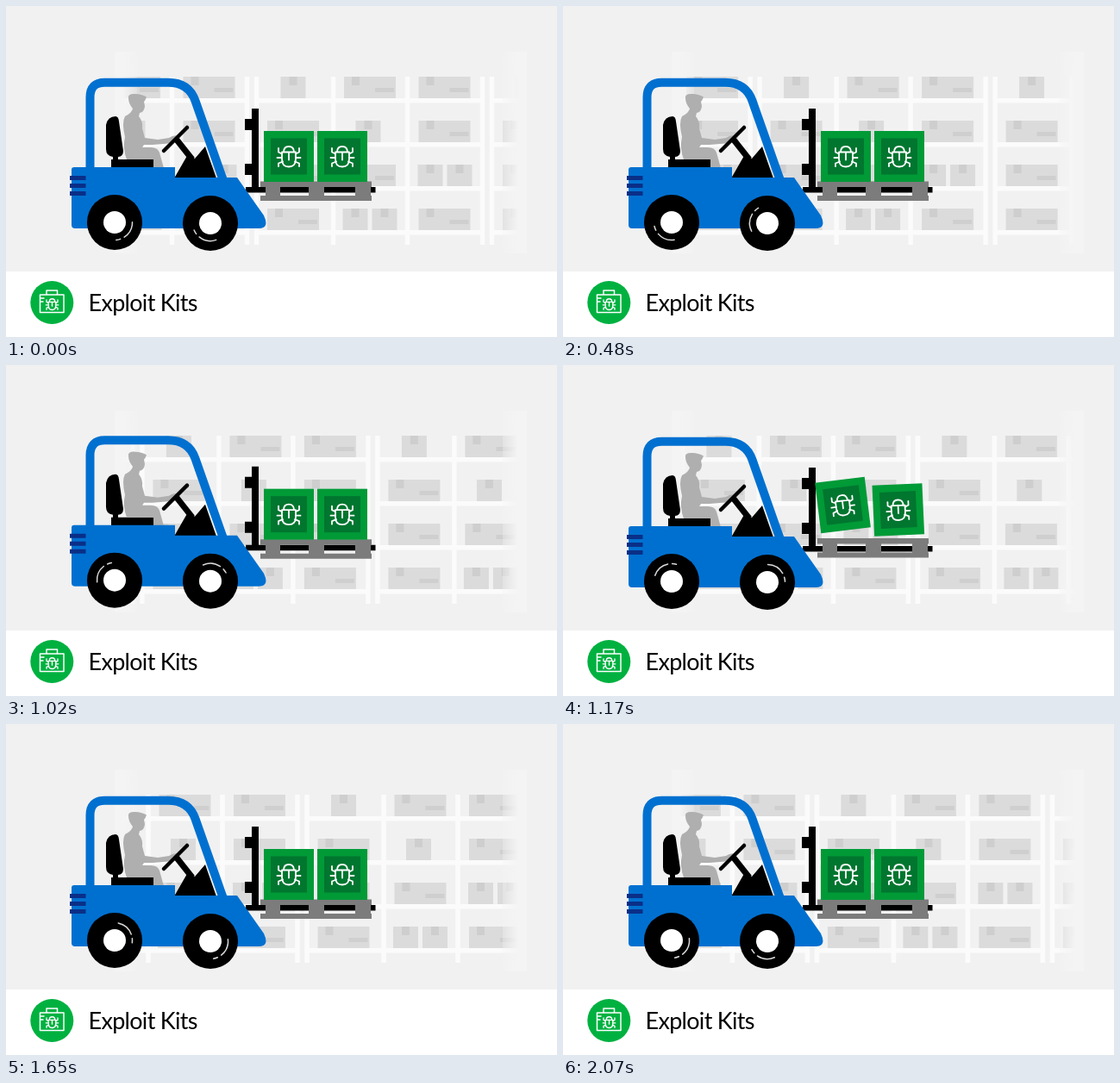
An HTML page for the animation above (2.1 s loop, 639 by 384 pixels).

```html
<!DOCTYPE html>
<html lang="en">
<head>
<meta charset="utf-8">
<title>Exploit Kits</title>
<style>
  html, body { margin: 0; width: 100%; height: 100%; overflow: hidden; background: #fff; }
  svg { display: block; width: 639px; height: 384px; }
  text { font: 27px Lato, "Open Sans", sans-serif; letter-spacing: -.7px; }
  .line { fill: none; stroke: #fff; stroke-linejoin: round; stroke-linecap: round; }
  .blue { fill: #0070d0; }
  .grey { fill: #7c7c7c; }
</style>
</head>
<body>
<svg viewBox="0 0 639 384">
  <defs>
    <linearGradient id="fadeL">
      <stop offset=".35" stop-color="#f4f4f4"/>
      <stop offset="1" stop-color="#f4f4f4" stop-opacity=".3"/>
    </linearGradient>
    <linearGradient id="fadeR">
      <stop offset="0" stop-color="#f4f4f4" stop-opacity=".3"/>
      <stop offset=".65" stop-color="#f4f4f4"/>
    </linearGradient>
    <clipPath id="hall"><rect x="126" y="52" width="478" height="235"/></clipPath>
    <g id="bug" class="line">
      <path d="M-8-5H8V3Q8 12 0 12Q-8 12-8 3ZM-6-5Q-6-11.500 0-11.500Q6-11.500 6-5M0-5V4"/>
      <path id="legs" d="M-8 1.500H-13.500M-8-3L-12-5V-9.500M-7 6L-12 8V11.500"/>
      <use href="#legs" transform="scale(-1 1)"/>
    </g>
    <g id="crate">
      <rect x="-29" y="-29.500" width="58" height="59" fill="#009a37"/>
      <rect x="-21" y="-21" width="42" height="42" fill="#00762f"/>
      <use href="#bug" stroke-width="1.8"/>
    </g>
    <g id="wheel">
      <circle r="32"/>
      <circle r="13" fill="#fff"/>
    </g>
  </defs>

  <rect width="639" height="308" fill="#f1f1f1"/>
  <g clip-path="url(#hall)"><g id="shelves"></g></g>
  <rect x="126" y="53" width="26" height="234" fill="url(#fadeL)"/>
  <rect x="576" y="53" width="28" height="234" fill="url(#fadeR)"/>

  <g id="truck">
    <path d="M285 119h8v91h135.500v6.500H278V210h7V196h-8V183h8V144h-8V131h8Z"/>
    <g id="pallet" class="grey">
      <path d="M295 203.500H424V210H423V220H424V226H295V220H301V210H295ZM318 210V220H351V210ZM369 210V220H405V210Z" fill-rule="evenodd"/>
    </g>
    <use id="crateA" href="#crate"/>
    <use id="crateB" href="#crate"/>
    <path d="M116 138Q118 128 127 128Q130.500 128 131 134L136 168Q136 175 130 175V179H124V175Q116 174 116 166ZM122 178H171V188H122Z"/>
    <path fill="#afafaf" d="M142 107Q141 101.500 150 102Q157 102 163 105.500L161.500 109L160 111L161 116Q160.500 123 155 124L154 128Q159 134 158 142L161 153L176 155L189 153Q195 149 200 151L198 157Q194 160 188 159.500L170 161H160L158 164H168Q176 164 178 170L183 188H171V178H140Q135 165 138 152Q134 135 138 128Q146 124 147 119Q142 113 142 107Z"/>
    <path d="M183 168L210 141" stroke="#000" stroke-width="4.500" stroke-linecap="round"/>
    <path d="M197 154L216 178" stroke="#000" stroke-width="7"/>
    <path d="M195 200L211 172L219 177L231 163L244 200Z"/>
    <path d="M97.500 190V106Q97.500 88.700 114.500 88.700H188Q212 88.700 219.500 110L251.500 201" fill="none" stroke="#0070d0" stroke-width="10"/>
    <path class="blue" d="M79 187H196V199H268L299 243Q306 258 293 258H80Q76 258 76 254V190Q76 187 79 187Z"/>
    <path fill="#0a2f87" d="M74 197h18.500v5H74ZM74 206h18.500v5H74ZM74 215h18.500v5H74Z"/>
    <use href="#wheel" x="126" y="251"/>
    <use href="#wheel" x="237" y="252"/>
    <path id="shineA" class="line"/>
    <path id="shineB" class="line"/>
  </g>

  <rect y="308" width="639" height="76" fill="#fff"/>
  <circle cx="53.3" cy="344" r="25" fill="#00b140"/>
  <path class="line" stroke-width="1.500" d="M39.500 335H67V355.500H39.500ZM47 335V330H59.500V335M39.500 339H44M39.500 343H43"/>
  <use href="#bug" stroke-width="2.500" transform="translate(53.500 346) scale(.54)"/>
  <text x="95.500" y="354.300">Exploit Kits</text>
</svg>

<script>
const LOOP = 2100, STEP = 30, UNIT = 273;
const $ = id => document.getElementById(id);
const rect = (x, y, w, h, fill) =>
  `<rect x="${x}" y="${y}" width="${w}" height="${h}" fill="${fill}"/>`;

// Shelf contents: each box sits on a row and is either wide or narrow.
const narrow = (x, y) => rect(x, y, 29, 25, "#dbdbdb") + rect(x + 10, y, 9, 10, "#cecece");
const wide = (x, y) => rect(x, y, 60, 25, "#dbdbdb") + rect(x + 9, y, 9, 10, "#cecece")
  + rect(x + 36, y + 13, 22, 5, "#cfcfcf");
const pair = (x, y) => narrow(x, y) + narrow(x + 34, y);
const rows = [82, 133, 184, 235];

function unit(k) {
  let s = "";
  rows.forEach((y, r) => {
    s += rect(11, y + 25, UNIT - 11, 5.5, "#fbfbfb");
    s += r === 0 ? narrow(39, y) : wide(23.5, y);
    s += r === 1 ? narrow(126, y) : r === 3 ? pair(111, y) : wide(112.5, y);
    s += r === 2 ? pair(198, y) : wide(199, y);
  });
  for (const x of [0, 11, 100, 186]) s += rect(x - 2.75, 82, 5.5, 195, "#fbfbfb");
  return `<g transform="translate(${k * UNIT} 0)">${s}</g>`;
}
$("shelves").innerHTML = [-1, 0, 1, 2].map(unit).join("");

// Tyre highlight: a long arc and a short dash.
const polar = deg => {
  const a = deg * Math.PI / 180;
  return `${(20.5 * Math.cos(a)).toFixed(2)} ${(20.5 * Math.sin(a)).toFixed(2)}`;
};
const arc = (a, b) => `M${polar(a)}A20.5 20.5 0 0 1 ${polar(b)}`;
for (const id of ["shineA", "shineB"]) {
  $(id).setAttribute("d", arc(-36, 22) + arc(36, 50));
  $(id).setAttribute("stroke-width", 1.5);
  $(id).style.stroke = "#d9d9d9";
}

// Rows are: time, then values; eased between rows.
const bounce = [[960, 0], [1035, -1.5], [1110, 0.7], [1155, 0]];
const lift = [[1020, 0], [1110, -2.5], [1170, -2.5], [1290, 0]];
const hopA = [[1020, 0, 0, 0], [1110, -2, -8, -4.5], [1170, -3.5, -12, -6.9],
  [1260, -2, -7, -4], [1350, 0, 0, 0], [1410, 0, -1.5, -.8], [1440, 0, -1, -.5], [1500, 0, 0, 0]];
const hopB = [[1020, 0, 0, 0], [1110, -.7, -4.5, -1.6], [1170, -1.2, -6.5, -2.6],
  [1260, -.6, -3.5, -1.4], [1340, 0, 0, 0], [1390, 0, -.6, -.3], [1440, 0, 0, 0]];

function pose(keys, t) {
  if (t <= keys[0][0]) return keys[0].slice(1);
  const i = keys.findIndex(k => k[0] > t);
  if (i < 0) return keys.at(-1).slice(1);
  const [a, b] = [keys[i - 1], keys[i]];
  const u = (t - a[0]) / (b[0] - a[0]), e = u * u * (3 - 2 * u);
  return a.slice(1).map((v, j) => v + (b[j + 1] - v) * e);
}

const place = (id, x, y, turn = 0) =>
  $(id).setAttribute("transform", `translate(${x} ${y}) rotate(${turn})`);

function crate(id, x, y, keys, t) {
  const [dx, dy, turn] = pose(keys, t);
  place(id, x + dx, y + dy, turn);
}

function draw(t) {
  const turn = 360 * t / LOOP;
  place("shelves", 279.5 - UNIT * t / LOOP, 0);
  place("truck", 0, pose(bounce, t)[0]);
  place("pallet", 0, pose(lift, t)[0]);
  crate("crateA", 328, 174.5, hopA, t);
  crate("crateB", 390, 174.5, hopB, t);
  place("shineA", 126, 251, 35 + turn);
  place("shineB", 237, 252, 107 + turn);
}

function tick() {
  const t = performance.now() % LOOP;
  draw(Math.floor(t / STEP) * STEP);
  requestAnimationFrame(tick);
}
tick();
</script>
</body>
</html>
```
